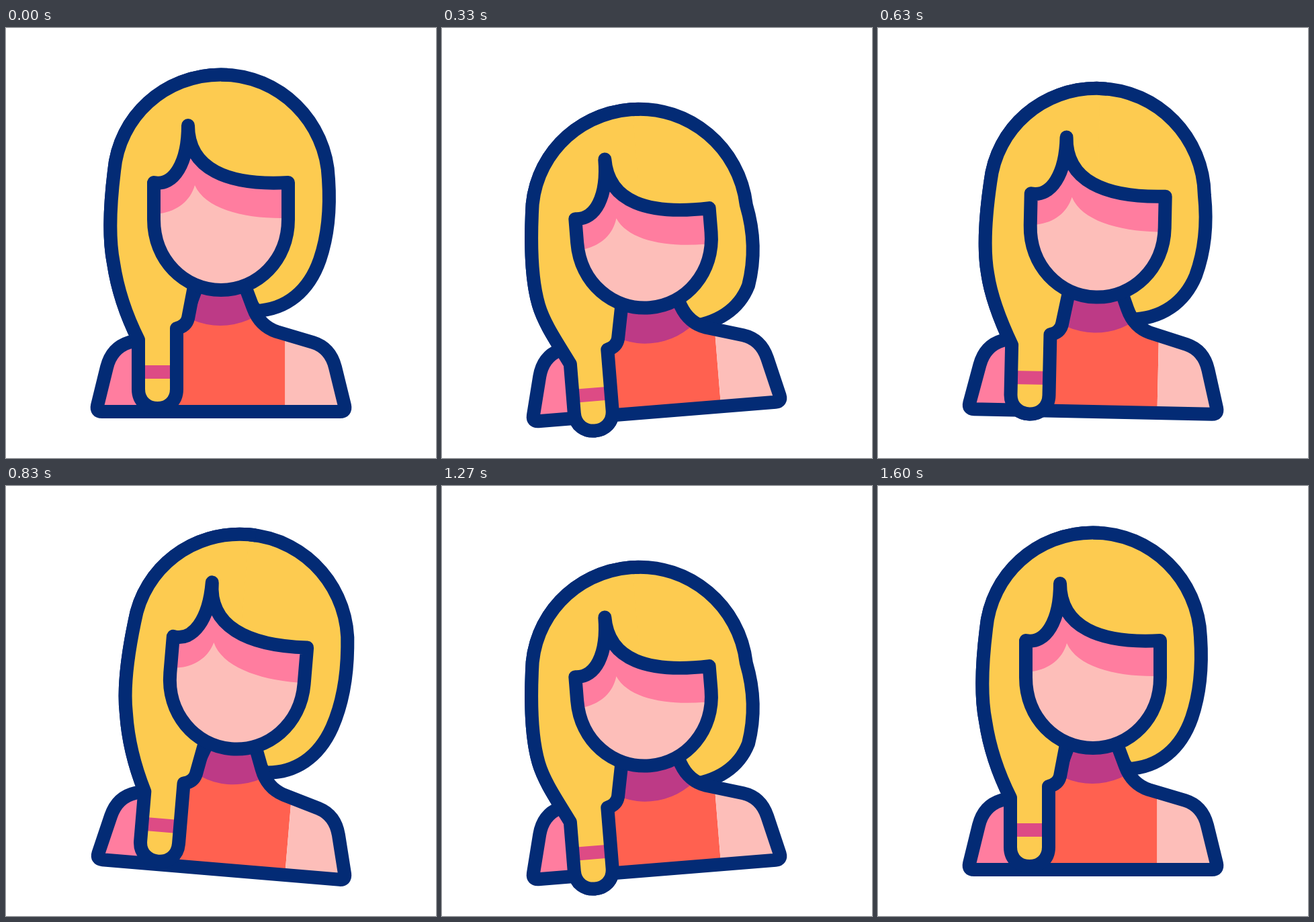
These frames come from a looping animation (640 by 640 pixels, 2 s). An HTML page with a canvas:

```html
<!DOCTYPE html>
<html lang="en">
<head>
<meta charset="utf-8">
<title>Nodding woman icon</title>
<style>
  html, body { margin: 0; height: 100%; overflow: hidden; background: #fff; }
  canvas { display: block; width: 100vw; height: 100vh; }
</style>
</head>
<body>
<canvas width="640" height="640"></canvas>
<script>
const ctx = document.querySelector('canvas').getContext('2d');
const NAVY = '#032b75', YELLOW = '#fdcb50', SKIN = '#fdbeb9', PINK = '#ff7d9f',
      RED = '#ff6150', PURPLE = '#bd3a86', TIE = '#dd4b85';
const LOOP = 2000, STEP = 100 / 3, LAST_STEP = 48, KEY_STEPS = 12;
const TILTS = [0, -5, 5, -5, 0, 0];
const CHIN_DROP = 28, FACE_DROP = 49, HAIR_DROP = 54, FACE_SHIFT = 2;

const body = new Path2D(`M356,385 L368,417 C374,433 385,446 403,452 L457,468
  C473,473 485,485 490,505 L504,562 Q506,571 497,571 L143,571 Q134,571 136,562
  L150,505 C155,485 167,473 183,468 L237,452 C255,446 266,433 272,417 L284,385`);
const shadow = new Path2D(`M210,278 L230,276 C255,272 274,258 281,234
  C296,268 350,283 410,283 L430,283 L430,100 L210,100 Z`);

// Lowers each point of a path: by `drop` above y = from, easing to CHIN_DROP below y = to.
function nod(d, k, drop, from, to) {
  return d.replace(/([\d.]+),([\d.]+)/g, (_, x, y) => {
    const rise = Math.min(1, Math.max(0, (to - y) / (to - from)));
    return `${x},${+y + k * (CHIN_DROP + (drop - CHIN_DROP) * rise)}`;
  });
}

// The crown slides left while the lower right side swings out.
function hairPath(k) {
  const left = x => x - 3 * k, out = x => x + 4 * k;
  const outline = `M320,345 L372,421
    C${out(418)},419 ${out(451)},391 ${out(467)},345
    C${out(479)},310 ${out(483)},270 ${left(480)},225
    C${left(477)},140 ${left(408)},69.5 ${left(320)},69.5
    C${left(236)},69.5 ${left(168)},132 ${left(161)},213
    C${left(154)},270 ${left(153)},315 ${left(160)},350
    C${left(166)},390 180,430 197,464`;
  const braid = `L197,537.5 C197,575.5 254,575.5 254,537.5 L254,447
    Q268,444 271,432 L280,385`;
  return new Path2D(nod(outline, k, HAIR_DROP, 345, 430) + nod(braid, k, CHIN_DROP, 345, 430));
}

const facePath = k => new Path2D(nod(`M220,230 L220,285 C220,345 265,390 320,390
  C375,390 420,345 420,285 L420,230 C330,235 271,210 271,145
  C271,200 250,236 220,230 Z`, k, FACE_DROP, 230, 285));

function fill(shape, color) {
  ctx.fillStyle = color;
  ctx.fill(shape);
}

function rect(color, x, y, w, h) {
  ctx.fillStyle = color;
  ctx.fillRect(x, y, w, h);
}

function clipped(shape, paint) {
  ctx.save();
  ctx.clip(shape);
  paint();
  ctx.restore();
}

function leftOf(x) {
  const area = new Path2D();
  area.rect(0, 0, x, 700);
  return area;
}

// The line reaches a little further than the fill so that no seam shows.
function drawHair(hair, k, limit) {
  clipped(leftOf(limit), () => {
    fill(hair, YELLOW);
    rect(TIE, 197, 502 + CHIN_DROP * k, 57, 20);
  });
  clipped(leftOf(limit + 10), () => ctx.stroke(hair));
}

function drawBody(k) {
  clipped(body, () => {
    rect(PINK, 100, 380, 125, 200);
    rect(RED, 225, 380, 190.5, 200);
    rect(SKIN, 415.5, 380, 120, 200);
    const collar = new Path2D();
    collar.arc(319, 338 + CHIN_DROP * k, 105, 0, 2 * Math.PI);
    fill(collar, PURPLE);
  });
  ctx.stroke(body);
}

function drawFace(k) {
  const face = facePath(k);
  ctx.translate(FACE_SHIFT * k, 0);
  fill(face, SKIN);
  clipped(face, () => {
    ctx.translate(0, FACE_DROP * k);
    fill(shadow, PINK);
  });
  ctx.stroke(face);
}

function draw(time) {
  const step = Math.min(LAST_STEP, Math.floor((time % LOOP + 3.4) / STEP));
  const key = Math.floor(step / KEY_STEPS), u = step / KEY_STEPS - key;
  const ease = u * u * (3 - 2 * u);
  const k = key % 2 ? 1 - ease : ease;
  const tilt = TILTS[key] + (TILTS[key + 1] - TILTS[key]) * ease;

  ctx.resetTransform();
  rect('#fff', 0, 0, 640, 640);
  ctx.translate(320, 571);
  ctx.rotate(tilt * Math.PI / 180);
  ctx.translate(-320, -571);
  ctx.strokeStyle = NAVY;
  ctx.lineWidth = 20;
  ctx.lineCap = ctx.lineJoin = 'round';

  // The right side of the hair hangs behind the body, the braid in front of it.
  const hair = hairPath(k);
  drawHair(hair, k, 640);
  drawBody(k);
  drawHair(hair, k, 320);
  drawFace(k);
}

const start = performance.now();
function tick() {
  draw(performance.now() - start);
  requestAnimationFrame(tick);
}
tick();
</script>
</body>
</html>
```
